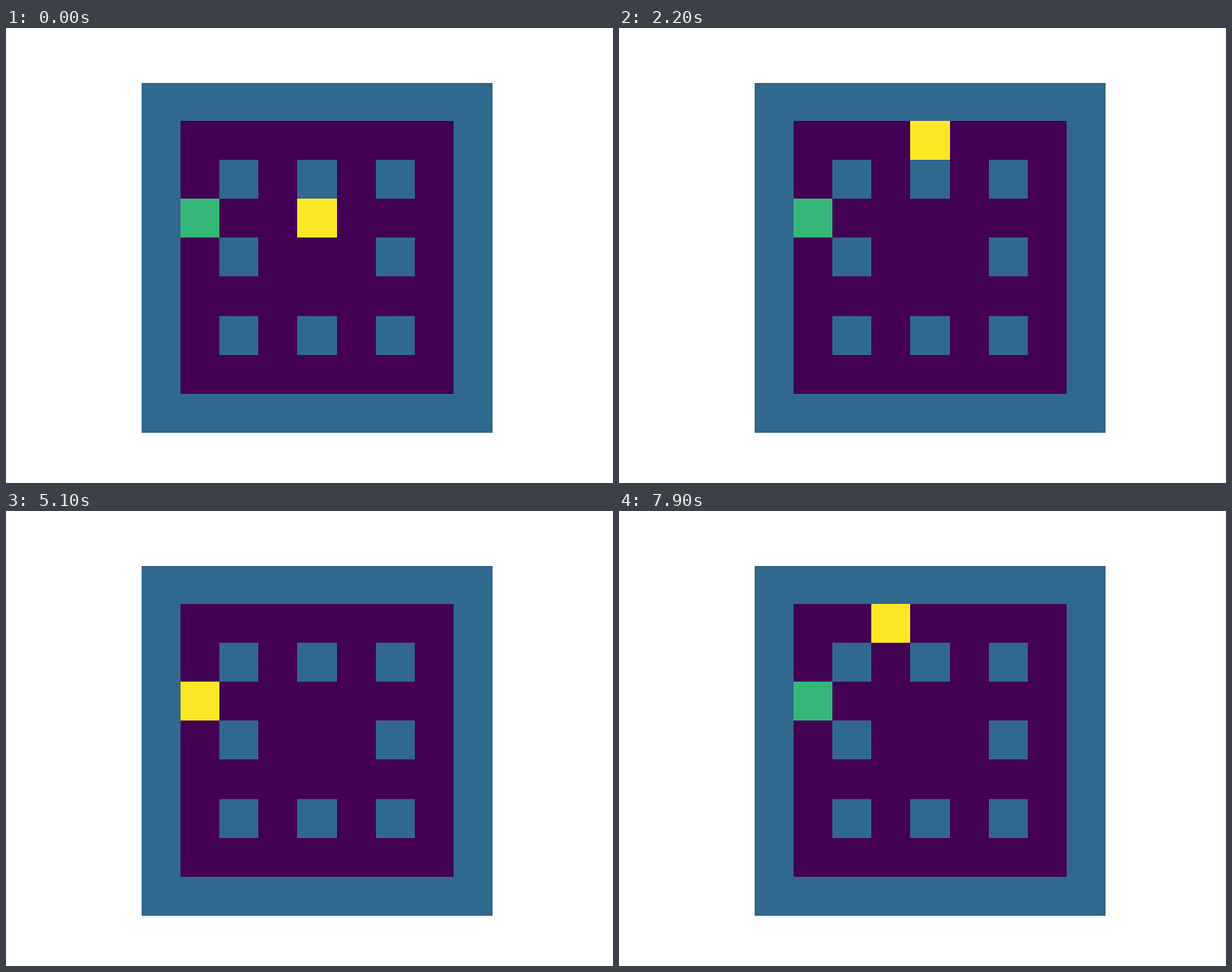
Write an HTML page that moves like this. It is 640 px wide and 480 px high and loops after 8 s.

```html
<!DOCTYPE html>
<html lang="en">
<head>
<meta charset="utf-8">
<title>Grid maze</title>
<style>
  html, body { margin: 0; width: 100%; height: 100%; overflow: hidden; background: #fff; }
  svg { display: block; width: 640px; height: 480px; }
</style>
</head>
<body>
<svg id="stage" viewBox="0 0 640 480" shape-rendering="crispEdges"></svg>
<script>
const STEP = 100;
const CELL = 369.6 / 9;
const FLOOR = '#440154', WALL = '#31688e', GOAL = '#35b779', AGENT = '#fde725';
const stage = document.getElementById('stage');

// Pixel edges of the grid lines
const edgeX = i => Math.round(143.2 + CELL * i);
const edgeY = i => Math.max(58, Math.floor(57.62 + CELL * i));

function place(rect, row, col, rows = 1, cols = 1) {
  const x = edgeX(col), y = edgeY(row);
  rect.setAttribute('x', x);
  rect.setAttribute('y', y);
  rect.setAttribute('width', edgeX(col + cols) - x);
  rect.setAttribute('height', edgeY(row + rows) - y);
}

function block(color, ...box) {
  const rect = document.createElementNS('http://www.w3.org/2000/svg', 'rect');
  rect.setAttribute('fill', color);
  place(rect, ...box);
  stage.append(rect);
  return rect;
}

block(WALL, 0, 0, 9, 9);
block(FLOOR, 1, 1, 7, 7);
for (let r = 2; r < 7; r += 2)
  for (let c = 2; c < 7; c += 2)
    if (r !== 4 || c !== 4) block(WALL, r, c);
block(GOAL, 3, 1);
const agent = block(AGENT, 3, 4);

// Each run: start row and column, then one move per step; "." waits.
// After reaching the goal the agent jumps to the next start.
const RUNS = [
  '34 DDRRRUUUULLLLLLDD',
  '36 LUULLLLDD',
  '11 DD',
  '36 LUULLLLDD',
  '61 UUU',
  '55 LLLLUU',
  '47 ULLUULLLLDD',
  '33 UU.LLDD',
  '65 UUUUULL'
];
const MOVES = { U: [-1, 0], D: [1, 0], L: [0, -1], R: [0, 1], '.': [0, 0] };

const path = RUNS.flatMap(run => {
  const [start, moves] = run.split(' ');
  let [r, c] = [...start].map(Number);
  const cells = [[r, c]];
  for (const m of moves) {
    r += MOVES[m][0];
    c += MOVES[m][1];
    cells.push([r, c]);
  }
  return cells;
});

function draw(ms) {
  place(agent, ...path[Math.floor(ms / STEP) % path.length]);
}

let begin;
function tick(now) {
  begin ??= now;
  draw(Math.max(0, now - begin));
  requestAnimationFrame(tick);
}
draw(0);
requestAnimationFrame(tick);
</script>
</body>
</html>
```
